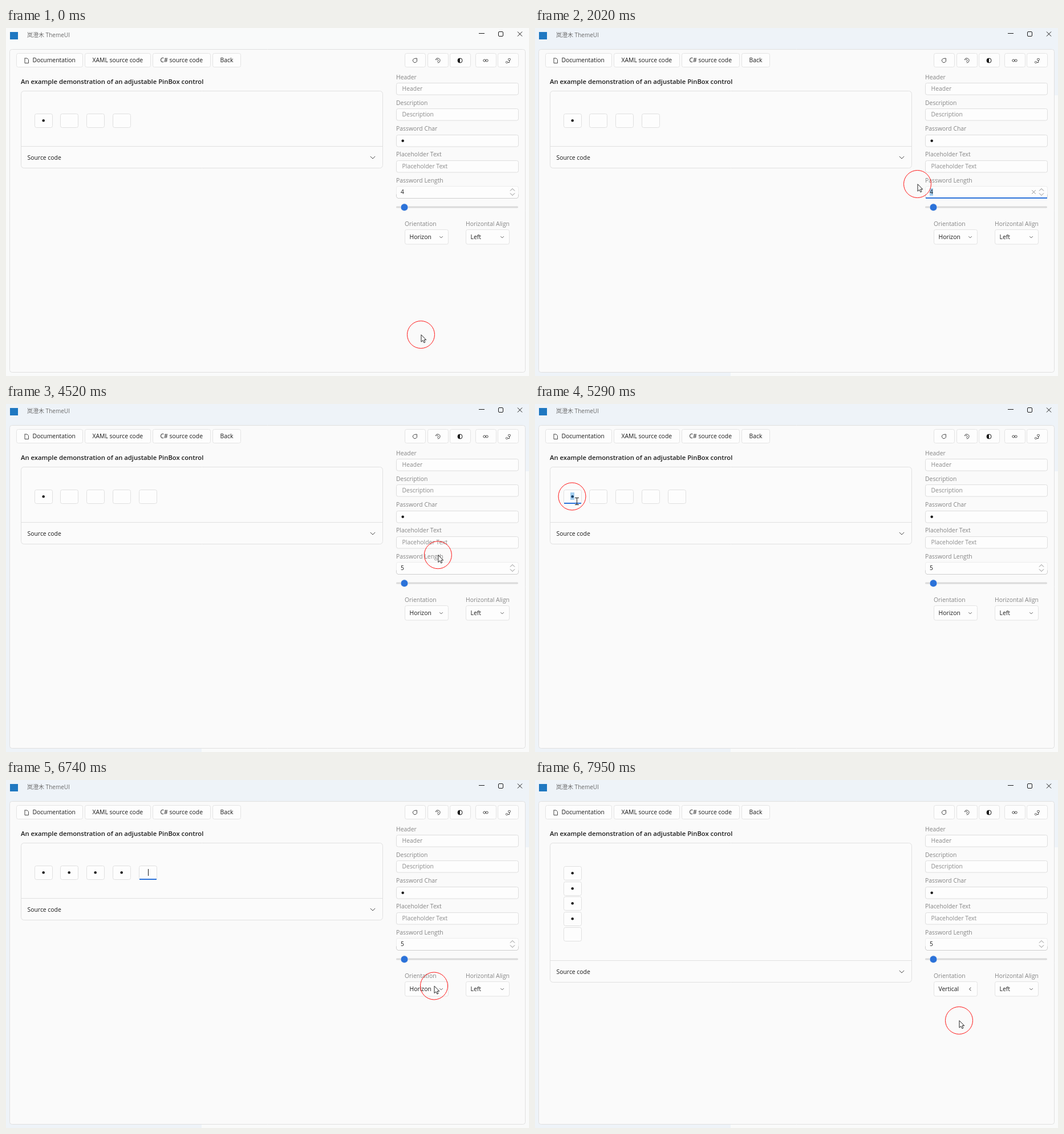
Write an HTML page with a canvas that moves like this. It is 917 px wide and 610 px high and loops after 8 s.

```html
<!DOCTYPE html>
<html lang="en">
<head>
<meta charset="utf-8">
<title>PinBox demo</title>
<style>
  html, body { margin: 0; width: 100%; height: 100%; overflow: hidden; background: #f9fafa; }
  canvas { display: block; }
</style>
</head>
<body>
<canvas id="stage" width="917" height="610"></canvas>
<script>
const ctx = document.getElementById('stage').getContext('2d');
const LOOP = 8000;
const FONT = '"Open Sans", "Noto Sans", "Noto Sans CJK SC", sans-serif';
const INK = '#1c1c1c', MUTED = '#858585', GREY = '#4a4a4a', LINE = '#e0e0e0';
const FACE = '#fdfdfd', ACCENT = '#2b72d9', SELECT = '#a3cdef';

// Moments of the interaction, in ms
const T = {
  focusNumber: 1230, blurNumber: 3030, grow: 3390, hideClear: 3460,
  focusPin: 5285, open: 7150, close: 7850, vertical: 7900
};
const keyTime = i => 5590 + 280 * i;
const ROW = 45.25;
const pinX = i => Math.round(49.6 + 45.8 * i);

// Pointer moves; it rests between them. "bow" bends a move vertically.
const HOME = { x: 727.5, y: 537.5 };
const MOVES = [
  { from: 0, to: 400, x: 224.5, y: 189.5 },
  { from: 400, to: 760, x: 760.5, y: 309 },
  { from: 760, to: 1060, x: 722.5, y: 286 },
  { from: 1230, to: 1520, x: 666.5, y: 278.5 },
  { from: 1620, to: 2020, x: 670.5, y: 273.5 },
  { from: 2220, to: 2530, x: 892.5, y: 301 },
  { from: 2690, to: 3180, x: 891.5, y: 284.5 },
  { from: 4310, to: 5140, x: 58.5, y: 161.5 },
  { from: 5240, to: 5290, x: 65, y: 162 },
  { from: 6000, to: 6740, x: 750.5, y: 361, bow: -57 },
  { from: 7250, to: 7720, x: 743.5, y: 421.5 }
];

const clamp = v => Math.max(0, Math.min(1, v));
const mix = (a, b, u) => a + (b - a) * u;

function pointer(t) {
  let { x, y } = HOME;
  for (const m of MOVES) {
    if (t < m.from) break;
    const u = clamp((t - m.from) / (m.to - m.from)), e = u * u * (3 - 2 * u);
    x = mix(x, m.x, e);
    y = mix(y, m.y, e) + (m.bow || 0) * 4 * u * (1 - u);
  }
  return { x, y };
}

function box(x, y, w, h, r, fill, stroke) {
  ctx.beginPath();
  ctx.roundRect(x, y, w, h, r);
  if (fill) { ctx.fillStyle = fill; ctx.fill(); }
  if (stroke) { ctx.strokeStyle = stroke; ctx.lineWidth = 1; ctx.stroke(); }
}
function rect(x, y, w, h, color) {
  ctx.fillStyle = color;
  ctx.fillRect(x, y, w, h);
}
function line(points, color) {
  ctx.beginPath();
  points.forEach(p => ctx.lineTo(...p));
  ctx.strokeStyle = color;
  ctx.lineWidth = 1;
  ctx.stroke();
}
function arc(x, y, r, color, a = 0, b = Math.PI * 2) {
  ctx.beginPath();
  ctx.arc(x, y, r, a, b);
  ctx.strokeStyle = color;
  ctx.lineWidth = 1;
  ctx.stroke();
}
function disc(x, y, r, color, a = 0, b = Math.PI * 2) {
  ctx.beginPath();
  ctx.arc(x, y, r, a, b);
  ctx.fillStyle = color;
  ctx.fill();
}
function setFont(size = 10.4, weight = 400) {
  ctx.font = `${weight} ${size}px ${FONT}`;
}
// y is the middle of the capitals
function text(s, x, y, color = INK, size, weight) {
  setFont(size, weight);
  ctx.fillStyle = color;
  ctx.fillText(s, x, Math.round(y + 3.7));
}
function chevron(x, y, w, angle, color) {
  ctx.save();
  ctx.translate(x, y);
  ctx.rotate(angle);
  line([[-w, -w / 2], [0, w / 2], [w, -w / 2]], color);
  ctx.restore();
}
function cross(x, y, r, color) {
  line([[x - r, y - r], [x + r, y + r]], color);
  line([[x + r, y - r], [x - r, y + r]], color);
}

function titleBar() {
  box(7, 7, 14, 13, 0, '#1f78c1');
  text('岚澄木 ThemeUI', 37, 12.5, '#6a6a6a', 10);
  rect(829, 9, 10, 1, INK);
  box(863.5, 6.5, 8, 8, 1.5, null, INK);
  cross(901, 10.5, 4, INK);
}

// Each icon is drawn around its own centre
const ICONS = [
  () => {
    arc(0, 0, 3.6, GREY, -0.5, 5);
    line([[0.8, -3.8], [3.5, -3.8], [3.5, -1.2]], GREY);
  },
  () => {
    arc(0, 0, 4, GREY, -2.9, 1.6);
    arc(-1, 0, 2, GREY, -2.6, 1.5);
  },
  () => {
    arc(0, 0, 4, INK);
    disc(0, 0, 4, INK, Math.PI / 2, Math.PI * 1.5);
  },
  () => [-2.2, 2.2].forEach(x => arc(x, 0, 2, GREY)),
  () => {
    box(0.5, -3.5, 4, 3, 1, null, GREY);
    box(-3.5, 1.5, 3, 3, 1, null, GREY);
    line([[0, 3.5], [2.5, 3.5], [2.5, 0]], GREY);
  }
];

function button(x, w) {
  box(x + 0.5, 44.5, w, 24, 3, FACE, '#e4e4e4');
}

function toolbar() {
  let x = 18;
  ['Documentation', 'XAML source code', 'C# source code', 'Back'].forEach((label, i) => {
    const icon = i ? 0 : 15;
    setFont();
    const w = Math.round(ctx.measureText(label).width + 26 + icon);
    button(x, w);
    text(label, x + 13.5 + icon, 56.5);
    x += w + 4;
  });
  line([[33, 53], [37, 53], [39.5, 55.5], [39.5, 61.5], [33, 61.5], [33, 52.5]], GREY);

  ICONS.forEach((icon, i) => {
    const left = Math.round(699 + 39.5 * i + (i > 2 ? 5 : 0));
    button(left, 36);
    ctx.save();
    ctx.translate(left + 18, 57);
    icon();
    ctx.restore();
  });
}

function pin(x, y, filled, focused, selected) {
  box(x + 0.5, y + 0.5, 31, 24, 3, FACE, LINE);
  if (selected) rect(x + 12, y + 5, 7, 13, SELECT);
  if (filled) disc(x + 15.7, y + 12.3, 2.3, selected ? '#173f66' : INK);
  if (focused) {
    if (!filled) rect(x + 16, y + 6, 1, 12, INK);
    rect(x + 1, y + 23, 30, 2, ACCENT);
  }
}

function example(t) {
  const vertical = t >= T.vertical, shift = vertical ? 109 : 0;
  text('An example demonstration of an adjustable PinBox control', 26, 94, INK, 11.28, 600);
  box(26.5, 110.5, 634, 135 + shift, 5, '#fbfbfb', LINE);
  rect(27, 207 + shift, 633, 1, LINE);
  text('Source code', 37.5, 227 + shift);
  chevron(643, 227 + shift, 4.2, 0, GREY);

  let typed = 0;
  while (typed < 4 && t >= keyTime(typed)) typed++;
  const count = t >= T.grow ? 5 : 4;
  for (let i = 0; i < count; i++) {
    const x = vertical ? pinX(0) : pinX(i);
    const y = vertical ? Math.round(151 + 26.7 * i) : 150;
    const focused = t >= T.focusPin && t < T.open && i === typed;
    pin(x, y, i < Math.max(1, typed), focused, focused && i === 0);
  }
}

function numberBox(t, y) {
  box(684.5, y, 214, 21, 3, FACE, '#ededed');
  line([[684.5, y + 14], [684.5, y + 18], [687, y + 21], [896, y + 21], [898.5, y + 18],
    [898.5, y + 14]], '#cfcfcf');
  if (t >= T.focusNumber && t < T.blurNumber) {
    if (pointer(t).x < 697) rect(692, y + 3.5, 6, 13, SELECT);
    rect(685, y + 19.5, 213, 2, ACCENT);
  }
  text(t >= T.grow ? '5' : '4', 692, 287.5);
  if (t >= T.focusNumber && t < T.hideClear) cross(874.5, 287.5, 3.2, '#8a8a8a');
  chevron(888, 283.5, 4, Math.PI, '#8a8a8a');
  chevron(888, 291.5, 4, 0, '#8a8a8a');
}

function combo(x, label, value, angle) {
  box(x + 0.5, 353.5, 76, 25.5, 3, FACE, '#e4e4e4');
  text(label, x, 343.5, MUTED);
  text(value, x + 8.5, 366.5);
  chevron(x + 64, 366.5, 2.8, angle, '#666');
}

function settings(t) {
  const names = ['Header', 'Description', 'Password Char', 'Placeholder Text', 'Password Length'];
  names.forEach((name, i) => {
    const mid = 106.5 + ROW * i, top = Math.round(mid - 10.5) + 0.5;
    text(name, 684, mid - 20.5, MUTED);
    if (i === 4) return numberBox(t, top);
    box(684.5, top, 214, 20.5, 3, FACE, '#dedede');
    if (i === 2) disc(695.7, mid + 0.7, 2.3, INK);
    else text(name, 694.5, mid, '#8a8a8a');
  });
  box(684, 312.5, 214, 3, 1.5, '#dadada');
  disc(698.5, 314.2, 7, '#e9edf3');
  disc(698.5, 314.2, 6, ACCENT);

  const turn = clamp((t - T.open) / 200) - clamp((t - T.close) / 200);
  combo(699, 'Orientation', t >= T.vertical ? 'Vertical' : 'Horizon', turn * Math.PI);
  combo(806, 'Horizontal Align', 'Left', 0);
}

function popup(t, y) {
  if (t < T.open || t >= T.close) return;
  const h = 72 * (1 - (1 - clamp((t - T.open + 50) / 200)) ** 3);
  ctx.save();
  ctx.shadowColor = 'rgba(0,0,0,.14)';
  ctx.shadowBlur = 8;
  ctx.shadowOffsetY = 3;
  box(699.5, 382.5, 76, h, 4, FACE);
  ctx.restore();
  box(699.5, 382.5, 76, h, 4, null, LINE);
  ctx.save();
  ctx.beginPath();
  ctx.rect(699, 383, 77, h);
  ctx.clip();
  ['Horizon', 'Vertical'].forEach((name, i) => {
    const top = 386 + 33 * i, hover = y >= top && y < top + 33;
    if (i === 0 || hover) box(703, top, 69, 31, 3, '#f0f0f0');
    if (i === 0) box(703, top + 9, 2, 13, 1, ACCENT);
    text(name, 711, top + 16);
  });
  ctx.restore();
}

function overText(x, y) {
  const inField = x > 684 && x < 866 && y > 96 && y < 299 && (y - 96) % ROW < 21;
  const inPin = x > 50 && x < 265 && y > 150 && y < 175 && (x - 50) % 45.8 < 32;
  return inField || inPin;
}

function cursor({ x, y }) {
  arc(x, y, 24, '#ff1414');
  if (overText(x, y)) {
    const left = Math.floor(x + 8), top = Math.round(y + 1.5);
    rect(left, top, 1, 12, INK);
    [0, 12].forEach(d => rect(left - 3, top + d, 7, 1, INK));
    return;
  }
  const shape = [[0, 0], [0, 12.5], [2.9, 9.8], [4.9, 14], [6.9, 13.1], [5, 9], [8.8, 9]];
  ctx.beginPath();
  shape.forEach(([dx, dy]) => ctx.lineTo(x + 0.5 + dx, y + 0.2 + dy));
  ctx.closePath();
  ctx.fillStyle = '#fff';
  ctx.fill();
  ctx.strokeStyle = '#222';
  ctx.lineWidth = 1;
  ctx.stroke();
}

// The focused window is tinted along its top, left and part of its far edges
function backdrop(t) {
  rect(0, 0, 917, 610, '#f9fafa');
  if (t < T.focusNumber) return;
  const tint = '#eef3f8';
  rect(0, 0, 917, 118, tint);
  rect(0, 118, 343, 492, tint);
}

function draw(t) {
  const p = pointer(t);
  backdrop(t);
  box(6.5, 37.5, 904, 566, 4, '#fafafa', LINE);
  titleBar();
  toolbar();
  example(t);
  settings(t);
  popup(t, p.y);
  cursor(p);
}

const start = performance.now();
function tick() {
  draw((performance.now() - start) % LOOP);
  requestAnimationFrame(tick);
}
tick();
</script>
</body>
</html>
```
